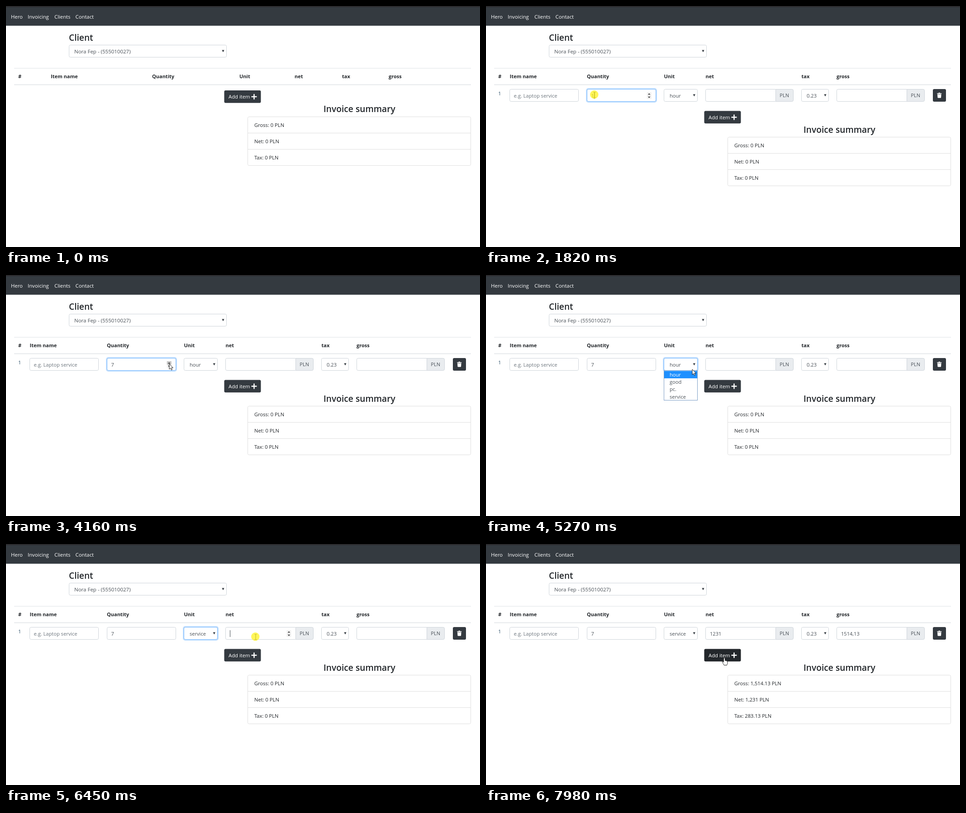
Recreate the animation shown at these times as an HTML page. Size 1048 px wide and 534 px high, loop 8000 ms.

```html
<!DOCTYPE html>
<html lang="en">
<head>
<meta charset="utf-8">
<title>Invoice form</title>
<style>
html, body { margin: 0; width: 100%; height: 100%; overflow: hidden; background: #fff; }
svg { display: block; width: 1048px; height: 534px; }
text { font: 11.1px "Open Sans", "Noto Sans", sans-serif; fill: #212529; white-space: pre; }
.nav, .btn { font-size: 11.3px; fill: #fff; }
.head { font-weight: 700; font-size: 11px; }
.title { font-weight: 600; font-size: 19.2px; }
.field { fill: #495057; }
.client { font-size: 11.5px; }
.sum { font-size: 11.2px; }
.hint { fill: #6c757d; }
</style>
</head>
<body>
<svg id="stage" viewBox="0 0 1048 534" xmlns="http://www.w3.org/2000/svg"></svg>
<script>
const LOOP = 8000;
const ROW_AT = 590, SHIFT = 45.5;
const FOCUS = { add: [ROW_AT, 1650], qty: [1650, 5050], unit: [5050, 6480], net: [6480, 7880] };
const STEPS_UP = [3380, 3610, 3720, 3830, 3960, 4080];
const KEYS = [6890, 7050, 7200, 7360];
const CLICKS = [[500, 590], [1690, 1890], [3380, 3530], [3610, 3690], [3770, 3845], [3925, 4000],
  [4080, 4160], [5050, 5150], [5660, 5740], [6450, 6580]];
// pointer track: time, x, y
const TRACK = [[70, 540, 476], [440, 527, 203], [1120, 527, 203], [1640, 240, 197], [2450, 240, 197],
  [2830, 386, 219], [3210, 361, 197], [4640, 361, 197], [4870, 495, 203], [5020, 456, 209],
  [5270, 456, 209], [5480, 443, 276], [5700, 443, 276], [6200, 552, 206], [7450, 552, 206], [7900, 527, 253]];

const text = (x, y, s, cls = '', id = '') => `<text x="${x}" y="${y}" class="${cls}" id="${id}">${s}</text>`;
const rect = (x, y, w, h, attrs) => `<rect x="${x}" y="${y}" width="${w}" height="${h}" ${attrs}/>`;
const box = (x, y, w, h = 27) => rect(x, y, w, h, 'rx="3" fill="#fff" stroke="#ced4da"');
const arrow = (x, y) => `<path d="M${x - 2.6} ${y}h5.2l-2.6 4.9z" fill="#343a40"/>`;
const group = (id, body) => `<g id="${id}">${body}</g>`;
const heads = xs => ['#', 'Item name', 'Quantity', 'Unit', 'net', 'tax', 'gross']
  .map((s, i) => text(xs[i], 160, s, 'head')).join('');
const ring = (id, x, w) => group(id,
  rect(x - 1.4, 183.1, w + 2.8, 29.8, 'rx="4" fill="none" stroke="#007bff" stroke-opacity=".25" stroke-width="2.2"') +
  rect(x, 184.5, w, 27, 'rx="3" fill="none" stroke="#80bdff"'));
const spin = (id, x) => group(id,
  rect(x - 5, 191, 10, 15, 'fill="#f1f1f1"') +
  rect(x - 5, 191, 10, 7.5, `id="${id}Hot" fill="#c6c6c6"`) +
  `<path d="M${x - 2.8} 196.5l2.8-3.2 2.8 3.2zM${x - 2.8} 200.7l2.8 3.2 2.8-3.2z" fill="#454545"/>`);
const addon = x => `<path d="M${x} 184.5h36q3 0 3 3v21q0 3-3 3h-36z" fill="#e9ecef" stroke="#ced4da"/>` +
  text(x + 8.8, 202, 'PLN', 'field');
const caret = id => rect(0, 191, 1, 15, `id="${id}" fill="#495057"`);

const frame = rect(0, 0, 1048, 43.7, 'fill="#343a40"') + rect(0, 0, 1048, 2.5, 'fill="#2b2b2e"') +
  [[11, 'Hero'], [48, 'Invoicing'], [107, 'Clients'], [153.5, 'Contact']]
    .map(([x, s]) => text(x, 28, s, 'nav')).join('') +
  text(139, 76.6, 'Client', 'title') + box(139.5, 86.5, 348) +
  text(151, 105, 'Nora Fep - (555010027)', 'field client') + arrow(480, 97.5) +
  rect(18, 137.5, 1010, 1, 'fill="#dee2e6"') + rect(18, 173.7, 1010, 1.5, 'fill="#dee2e6"');

const row = heads([27, 52.5, 223, 393.5, 485.5, 697.5, 775]) +
  `<text x="27" y="197.6" style="fill:#2c4f68">1</text>` +
  box(52.5, 184.5, 152) + text(61.5, 203, 'e.g. Laptop service', 'hint') +
  box(223.5, 184.5, 152) + text(232.5, 203, '1', 'field', 'qty') +
  box(393.5, 184.5, 74) + text(406, 203, 'hour', 'field', 'unit') + arrow(460.3, 195.6) +
  box(485.5, 184.5, 157) + text(495, 203, '', 'field', 'net') + addon(640.5) +
  box(697.5, 184.5, 60) + text(709, 203, '0.23', 'field') + arrow(750, 195.6) +
  box(775.5, 184.5, 158) + text(785, 203, '', 'field', 'gross') + addon(930.5) +
  rect(988, 184, 29, 28, 'rx="3" fill="#343a40"') +
  '<path d="M997.3 193.2h2.9l.8-1.2h2.6l.8 1.2h2.9v1.5h-10zM998 195.5h8.6l-.5 7.2q-.1 1-1 1h-5.6q-.9 0-1-1z" fill="#fff"/>' +
  ring('qtyRing', 223.5, 152) + ring('unitRing', 393.5, 74) + ring('netRing', 485.5, 154.5) +
  spin('qtySpin', 360.7) + spin('netSpin', 625.5) + caret('qtyCaret') + caret('netCaret');

const lower = rect(481.3, 185.7, 83.4, 30.2, 'id="addRing" rx="4" fill="none" stroke="#343a40" stroke-opacity=".5" stroke-width="2.4"') +
  rect(482.5, 186.9, 81, 27.8, 'id="add" rx="3"') + text(492, 205, 'Add item', 'btn') +
  '<path d="M543.5 201h10M548.5 196v10" stroke="#fff" stroke-width="2.5" stroke-linecap="round"/>' +
  text(702, 235.3, 'Invoice summary', 'title');

const summary = rect(534.5, 245.5, 493, 108, 'rx="3" fill="#fff" stroke="#dfdfdf"') +
  '<path d="M534.5 281.5h493M534.5 317.5h493" stroke="#dfdfdf"/>' +
  ['sumGross', 'sumNet', 'sumTax'].map((id, i) => text(549, 268 + 36 * i, '', 'sum', id)).join('');

const UNITS = ['hour', 'good', 'pc.', 'service'];
const menu = rect(393.5, 211.5, 74, 66, 'fill="#fff" stroke="#7b9dc6"') +
  rect(394, 0, 73, 16.4, 'id="pick" fill="#1e90ff"') +
  UNITS.map((s, i) => text(406, 225 + 16.2 * i, s, 'field', 'opt' + i)).join('');

const pointer = '<path id="arrow" d="M0 0V11.8L2.7 9.3 4.6 13.6 6.6 12.7 4.7 8.6H8.4Z" fill="#fff" stroke="#111" stroke-width=".9"/>' +
  '<path id="beam" d="M-2.5-6H-.6L0-5.4.6-6H2.5M0-5.4V5.4M-2.5 6H-.6L0 5.4.6 6H2.5" fill="none" stroke="#222"/>' +
  '<path id="hand" d="M-1.5.3Q0-1.5 1.5.3V5.5Q3 4.6 3.6 6 5 5.2 5.6 6.6 7 6 7 8V11.5Q6 13.5 5.6 15.5H-.8Q-1.5 13-4.5 9.5-5.5 7.6-4 7.4-2.6 7.6-1.5 9.2Z" fill="#fff" stroke="#111" stroke-width=".9"/>';

const stage = document.getElementById('stage');
stage.innerHTML = frame + group('empty', heads([27, 99, 323, 516, 638, 743, 846])) +
  group('row', row) + group('lower', lower) + group('summary', summary) + group('menu', menu) +
  group('pointer', pointer) + '<circle id="glow" r="9.2" fill="#fff21a" opacity=".72"/>';

const el = {};
stage.querySelectorAll('[id]').forEach(n => { if (n.id) el[n.id] = n; });
const show = (id, on) => { el[id].style.display = on ? '' : 'none'; };
const put = (id, s) => { if (el[id].textContent !== s) el[id].textContent = s; };
const move = (id, x, y) => el[id].setAttribute('transform', `translate(${x} ${y})`);
const during = (t, [a, b]) => t >= a && t < b;
const clamp = v => Math.max(0, Math.min(1, v));
const count = (times, t) => times.filter(k => t >= k).length;
const inside = (x, y, l, top, r, b) => x >= l && x <= r && y >= top && y <= b;
const blink = (t, from) => (t - from) % 1000 < 500;
const money = v => v.toLocaleString('en-US', { maximumFractionDigits: 2 });

function pointerAt(t) {
  const i = TRACK.findIndex(k => t < k[0]);
  if (i < 1) return TRACK[i < 0 ? TRACK.length - 1 : 0].slice(1);
  const [t0, x0, y0] = TRACK[i - 1], [t1, x1, y1] = TRACK[i];
  const n = Math.max(1, Math.round((t1 - t0) / 75));
  const u = Math.floor((t - t0) / (t1 - t0) * n + 1e-6) / n;
  const e = u * u * (3 - 2 * u);
  return [x0 + (x1 - x0) * e, y0 + (y1 - y0) * e];
}

function draw(t) {
  const hasRow = t >= ROW_AT, dy = hasRow ? SHIFT : 0;
  const [x, y] = pointerAt(t);
  const overQty = hasRow && inside(x, y, 223, 184, 376, 212);
  const overNet = hasRow && inside(x, y, 485, 184, 640, 212);
  const overAdd = inside(x, y, 482, 187 + dy, 564, 215 + dy);
  const onSpin = overQty && x > 355;

  show('empty', !hasRow);
  show('row', hasRow);
  move('lower', 0, dy);
  move('summary', 0, Math.floor(dy));
  el.add.setAttribute('fill', overAdd || during(t, [ROW_AT, 900]) ? '#23272b' : '#343a40');

  for (const [id, [a, b]] of Object.entries(FOCUS))
    el[id + 'Ring'].style.opacity = Math.min(clamp((t - a) / 100), 1 - clamp((t - b) / 90));

  put('qty', String(1 + count(STEPS_UP, t)));
  put('unit', t < 5660 ? 'hour' : 'service');
  show('qtySpin', overQty || during(t, FOCUS.qty));
  show('netSpin', overNet || during(t, FOCUS.net));
  show('qtySpinHot', onSpin);
  show('netSpinHot', false);

  const typed = count(KEYS, t);
  const net = Number('1231'.slice(0, typed));
  put('net', net ? String(net) : '');
  put('gross', net ? (net * 1.23).toFixed(2).replace('.', ',') : '');
  put('sumGross', `Gross: ${money(net * 1.23)} PLN`);
  put('sumNet', `Net: ${money(net)} PLN`);
  put('sumTax', `Tax: ${money(net * .23)} PLN`);

  show('qtyCaret', during(t, [1650, 3210]) && blink(t, 700));
  el.qtyCaret.setAttribute('x', 239);
  show('netCaret', during(t, [6450, 7880]) && blink(t, typed ? KEYS[typed - 1] : 6450));
  el.netCaret.setAttribute('x', 495 + typed * 6.35);

  show('menu', during(t, [5100, 5660]));
  const pick = Math.max(0, Math.min(3, Math.floor((y - 212) / 16.2)));
  el.pick.setAttribute('y', 212.5 + 16.2 * pick);
  UNITS.forEach((_, i) => { el['opt' + i].style.fill = i === pick ? '#fff' : ''; });

  const shape = overAdd ? 'hand' : (overQty && !onSpin) || overNet ? 'beam' : 'arrow';
  for (const id of ['arrow', 'beam', 'hand']) show(id, id === shape);
  show('pointer', t >= 70);
  move('pointer', x, y);
  show('glow', CLICKS.some(c => during(t, c)));
  move('glow', x - .7, y - .7);
}

const start = performance.now();
function tick() {
  draw((performance.now() - start) % LOOP);
  requestAnimationFrame(tick);
}
tick();
</script>
</body>
</html>
```
